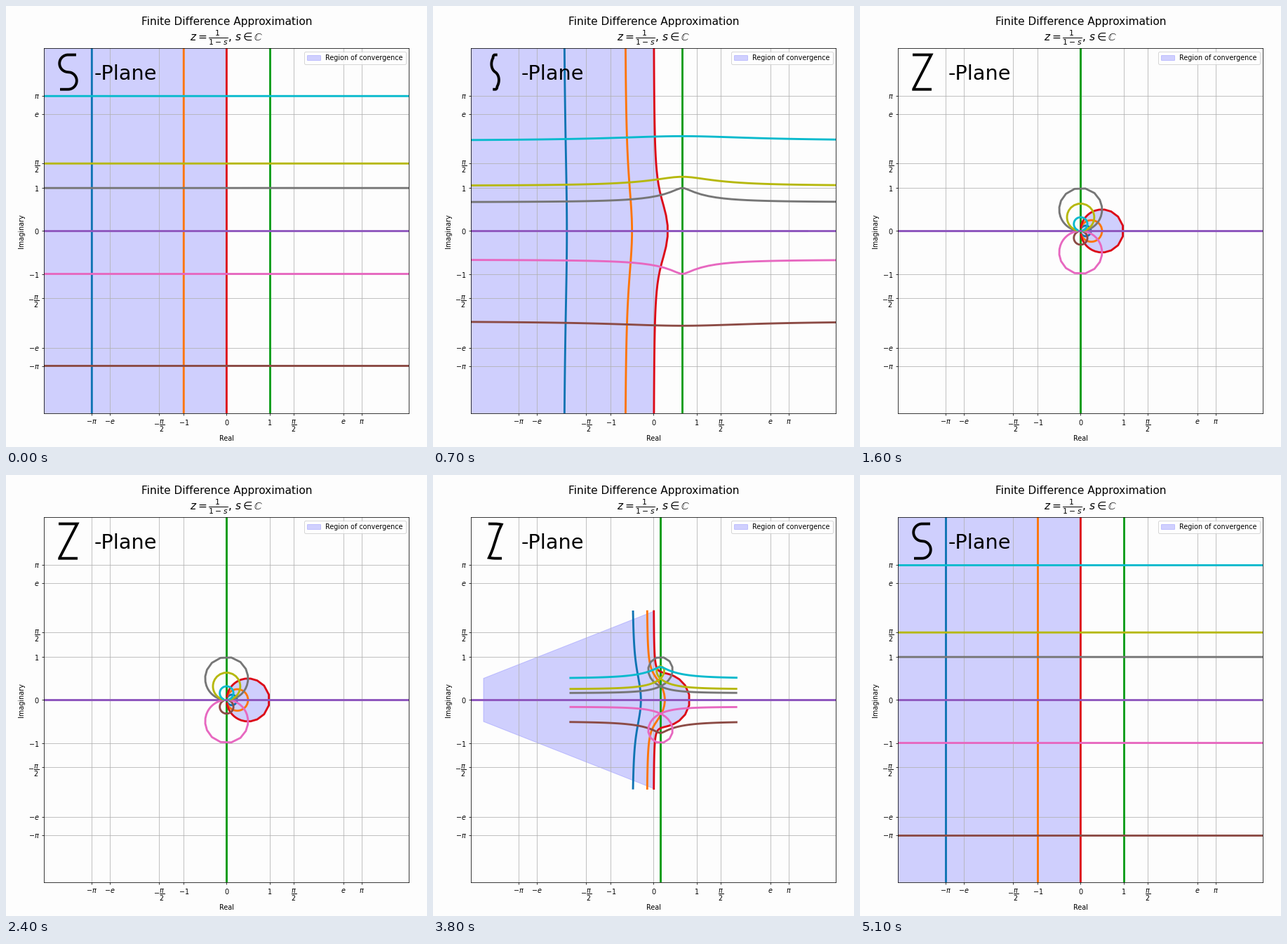
A matplotlib script for the animation above (5200 ms loop, 600 px wide and 628 px high).

```python
import numpy as np
import matplotlib.pyplot as plt
from matplotlib.animation import FuncAnimation

W, H, DPI = 600, 628, 64
K = 1.08            # scales nominal point sizes to this stage
FRAMES, INTERVAL = 52, 100
PI, E = np.pi, np.e
PAPER = "#fdfdfd"

plt.rcParams.update({
    "font.family": "DejaVu Sans",
    "font.size": 10 * K,
    "axes.linewidth": 0.8 * K,
    "grid.linewidth": 0.8 * K,
    "patch.linewidth": 1.0 * K,
    **{f"{a}tick.major.{k}": v * K for a in "xy"
       for k, v in (("size", 3.5), ("width", 0.8), ("pad", 3.5))},
})

fig = plt.figure(figsize=(W / DPI, H / DPI), dpi=DPI, facecolor=PAPER)

# Plot area
left, right, top, bottom = 54.4, 574.4, 60.3, 580.4
ax = fig.add_axes([left / W, 1 - bottom / H, (right - left) / W, (bottom - top) / H],
                  facecolor=PAPER)
ax.set_xlim(-4.25, 4.25)
ax.set_ylim(-4.25, 4.25)
ticks = [-PI, -E, -PI / 2, -1, 0, 1, PI / 2, E, PI]
names = [r"$-\pi$", r"$-e$", r"$-\dfrac{\pi}{2}$", "$-1$", "$0$", "$1$",
         r"$\dfrac{\pi}{2}$", "$e$", r"$\pi$"]
ax.set_xticks(ticks, names)
ax.set_yticks(ticks, names)
ax.grid(True)

# Overlay in pixel units, y pointing down
page = fig.add_axes([0, 0, 1, 1])
page.set_xlim(0, W)
page.set_ylim(H, 0)
page.axis("off")


def write(x, y, text, size, ha="center", va="baseline", **kw):
    page.text(x, y, text, fontsize=size * K, ha=ha, va=va, **kw)


write(314.5, 27, "Finite Difference Approximation", 16)
write(314.5, 49.5, r"$z = \frac{1}{1-s}$, $s \in \mathbb{C}$", 16)
write(314.5, 619, "Real", 10)
write(22.5, 320.4, "Imaginary", 10, va="center", rotation=90)
write(125.6, 105, "-Plane", 30, ha="left")
page.axhline(H - 0.5, color="#8c8c8c", lw=K)

# Grid lines of the s-plane
span = np.linspace(-4 * PI, 4 * PI, 100)
verticals = [(-PI, "#0f74b3"), (-1, "#ff7506"), (1, "#0c9d1a"), (0, "#dc0a18")]
horizontals = [(0, "#8f58be"), (-PI, "#8c4b45"), (-1, "#e768c0"),
               (1, "#767676"), (PI / 2, "#b6b80c"), (PI, "#08bacd")]
curves = [(x + 1j * span, c) for x, c in verticals]
curves += [(span + 1j * y, c) for y, c in horizontals]
half_plane = np.concatenate([[-8 * PI - 1j * PI], 1j * span, [-8 * PI + 1j * PI]])


def to_z(s):
    return 1 / (1 - s)


def mix(p, q, a):
    return (1 - a) * p + a * q


def resample(path, n=160):
    """Spread n points evenly along a complex polyline."""
    dist = np.concatenate([[0], np.cumsum(np.abs(np.diff(path)))])
    t = np.linspace(0, dist[-1], n)
    return np.interp(t, dist, path.real) + 1j * np.interp(t, dist, path.imag)


def letter_s():
    r = 12.3
    turn = np.linspace(0, PI, 50)
    upper = 88.5 + 81.8j + r * np.exp(-1j * (PI / 2 + turn))
    lower = 88.5 + 106.4j + r * np.exp(1j * (turn - PI / 2))
    return resample(np.concatenate([[100 + 69.5j], upper, lower, [77 + 118.7j]]))


S = letter_s()
Z = resample(np.array([75 + 69.5j, 101.5 + 69.5j, 76 + 118.7j, 102 + 118.7j]))

region, = ax.fill(half_plane.real, half_plane.imag, color="blue", alpha=0.18,
                  label="Region of convergence")
lines = [ax.plot([], [], color=c, lw=3 * K)[0] for _, c in curves]
letter, = page.plot([], [], color="black", lw=4 * K, solid_joinstyle="miter",
                    solid_capstyle="butt")
ax.legend(loc="upper right")

STEEP, RISE, FALL = 0.936, 7.75, 39.78


def sigmoid(u):
    return 1 / (1 + np.exp(-u))


def amount(i):
    """Share of the mapping applied: up around RISE, back around FALL."""
    return sigmoid(STEEP * (i - RISE)) - sigmoid(STEEP * (i - FALL))


def draw(i):
    a = amount(i)
    for line, (s, _) in zip(lines, curves):
        p = mix(s, to_z(s), a)
        line.set_data(p.real, p.imag)
    p = mix(half_plane, to_z(half_plane), a)
    region.set_xy(np.column_stack([p.real, p.imag]))
    p = mix(S, Z, a)
    letter.set_data(p.real, p.imag)
    return [region, letter, *lines]


draw(0)
anim = FuncAnimation(fig, draw, frames=FRAMES, interval=INTERVAL,
                     repeat=True, repeat_delay=0, blit=False)
plt.show()
```
